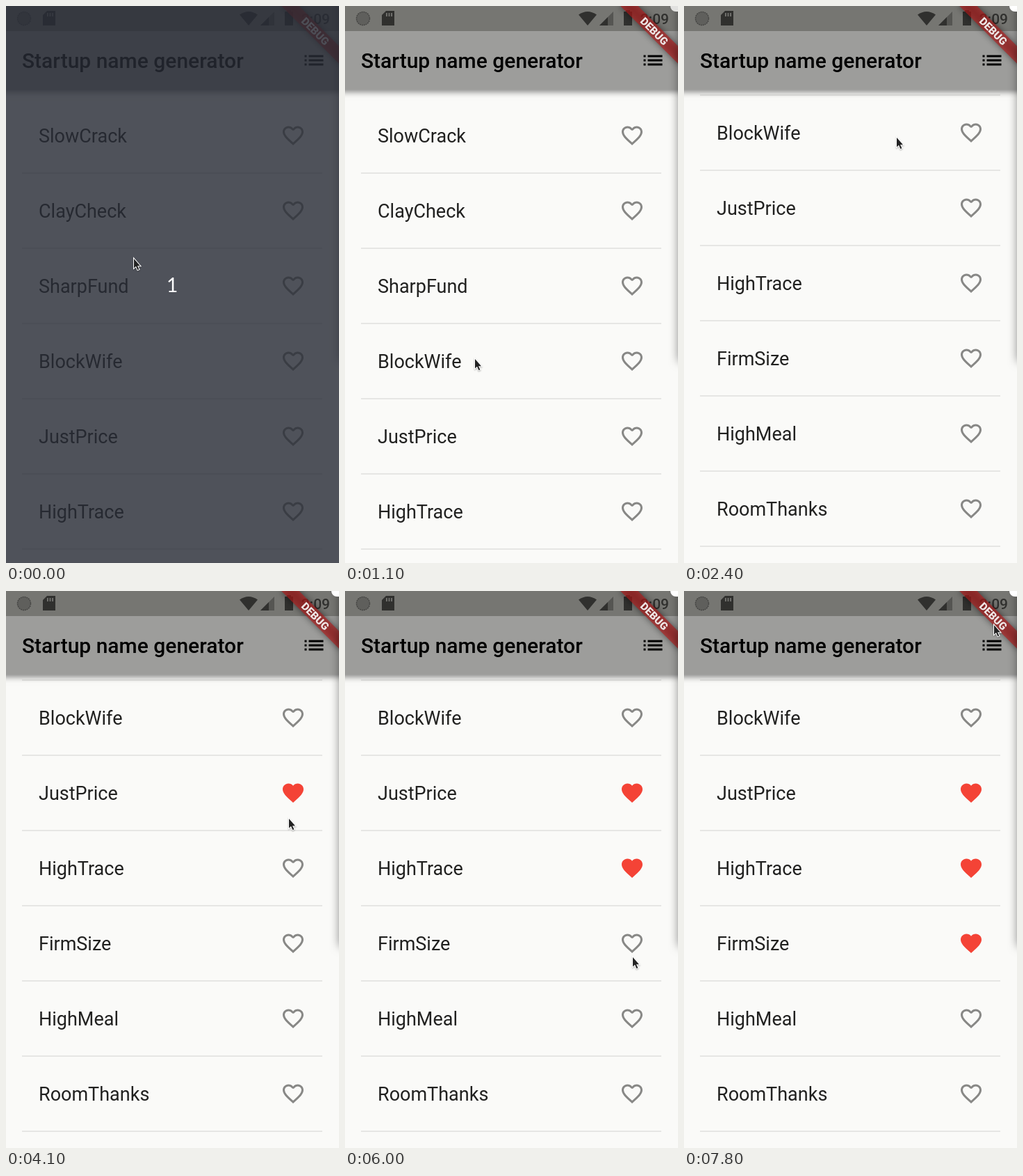
Recreate the animation shown at these times as an HTML page with a canvas. Size 479 by 800 pixels, loop 8 s.

```html
<!DOCTYPE html>
<html lang="en">
<head>
<meta charset="utf-8">
<title>Startup name generator</title>
<style>
  html, body { margin: 0; width: 100%; height: 100%; overflow: hidden; background: #fafaf8; }
  canvas { display: block; }
</style>
</head>
<body>
<canvas id="stage" width="479" height="800"></canvas>
<script>
const W = 479, H = 800, LOOP = 8000, STEP = 100;
const ctx = document.getElementById('stage').getContext('2d');

const NAMES = ['SlowCrack', 'ClayCheck', 'SharpFund', 'BlockWife', 'JustPrice',
  'HighTrace', 'FirmSize', 'HighMeal', 'RoomThanks'];
const LIKED_AT = { JustPrice: 3700, HighTrace: 4900, FirmSize: 6500 };
const ROW_H = 108, FIRST_ROW = 186, SCROLL_END = 328;

const smooth = p => p * p * (3 - 2 * p);
const out = p => 1 - (1 - p) ** 4;
const phase = (t, from, to) => Math.min(1, Math.max(0, (t - from) / (to - from)));

// Strokes of the pointer: begin, end, destination, easing across and down
const POINTER_START = { x: 184, y: 363 };
const POINTER_MOVES = [
  { from: 0, to: 600, x: 185, y: 518, ease: smooth },
  { from: 1000, to: 1900, x: 245, y: 186, ease: smooth },
  { from: 2300, to: 3200, x: 407, y: 275, ease: out, easeY: smooth },
  { from: 4020, to: 4600, x: 406, y: 391, ease: out },
  { from: 5200, to: 5900, x: 414, y: 530, ease: smooth },
  { from: 5950, to: 6200, x: 413, y: 494, ease: smooth },
  { from: 6700, to: 7200, x: 434, y: 118, ease: smooth },
  { from: 7300, to: 7800, x: 446, y: 49, ease: smooth }
];

const HEART = new Path2D('M12 21.35l-1.45-1.32C5.4 15.36 2 12.28 2 8.5 2 5.42 4.42 3 7.5 3c1.74 0 3.41.81 4.5 2.09C13.09 3.81 14.76 3 16.5 3 19.58 3 22 5.42 22 8.5c0 3.78-3.4 6.86-8.55 11.54z');
const ARROW = new Path2D('M0 0V13.5L3 10.8 5.4 16.2 7.4 15.3 5 10.2H9z');

function pointerAt(t) {
  const pos = { ...POINTER_START };
  for (const { from, to, x, y, ease, easeY = ease } of POINTER_MOVES) {
    const p = phase(t, from, to);
    pos.x += (x - pos.x) * ease(p);
    pos.y += (y - pos.y) * easeY(p);
  }
  return pos;
}

function rect(color, x, y, w, h) {
  ctx.fillStyle = color;
  ctx.fillRect(x, y, w, h);
}

function shape(color, points) {
  ctx.fillStyle = color;
  ctx.beginPath();
  points.forEach(([x, y]) => ctx.lineTo(x, y));
  ctx.fill();
}

function text(str, x, y, font, color, align = 'left') {
  ctx.font = font;
  ctx.fillStyle = color;
  ctx.textAlign = align;
  ctx.fillText(str, x, y);
}

function drawHeart(cx, cy, liked) {
  ctx.save();
  ctx.translate(cx - 18, cy - 18);
  ctx.scale(1.5, 1.5);
  if (liked) {
    ctx.fillStyle = '#f44336';
    ctx.fill(HEART);
  } else {
    ctx.clip(HEART);
    ctx.lineWidth = 4;
    ctx.lineJoin = 'round';
    ctx.strokeStyle = '#888886';
    ctx.stroke(HEART);
  }
  ctx.restore();
}

function drawList(t) {
  const scroll = Math.round(SCROLL_END * smooth(phase(t, 1105, 1920)));
  NAMES.forEach((name, i) => {
    const y = FIRST_ROW + i * ROW_H - scroll;
    text(name, 47, y + 10, '27px Roboto, sans-serif', '#212120');
    drawHeart(413, y, t >= LIKED_AT[name]);
    rect('#e6e6e4', 23, y + 53, 432, 2);
  });
}

function drawStatusBar() {
  const back = '#767672', dark = '#30302e';
  rect(back, 0, 0, W, 36);

  ctx.fillStyle = '#5f5f5c';
  ctx.strokeStyle = '#464644';
  ctx.lineWidth = 1.5;
  ctx.beginPath();
  ctx.arc(26, 18, 9.5, 0, 7);
  ctx.fill();
  ctx.save();
  ctx.setLineDash([2, 1]);
  ctx.stroke();
  ctx.restore();

  shape(dark, [[59, 7], [71, 7], [71, 28], [53, 28], [53, 13]]);
  for (let i = 0; i < 3; i++) rect(back, 59 + i * 3.6, 10, 1.8, 5);

  ctx.fillStyle = dark;
  ctx.beginPath();
  ctx.moveTo(349, 28);
  ctx.lineTo(336, 12.5);
  ctx.quadraticCurveTo(349, 3.5, 362, 12.5);
  ctx.fill();

  shape('#555552', [[386, 8], [386, 28], [366, 28]]);
  shape(dark, [[378, 16], [378, 28], [366, 28]]);

  rect(dark, 404, 6, 6, 3);
  rect(dark, 401, 8, 12, 20);
  text('2:09', 466, 26, '500 21px Roboto, sans-serif', dark, 'right');
}

function drawAppBar() {
  ctx.save();
  ctx.shadowColor = 'rgba(0,0,0,.5)';
  ctx.shadowBlur = 9;
  ctx.shadowOffsetY = 3;
  rect('#9d9d9b', -20, 0, W + 40, 120);
  ctx.restore();
  drawStatusBar();
  text('Startup name generator', 23, 89, '500 30px Roboto, sans-serif', '#000');
  for (let y = 70.5; y < 86; y += 6) {
    rect('#000', 429.5, y, 3, 3);
    rect('#000', 435.5, y, 21, 3);
  }
}

function drawRibbon() {
  ctx.save();
  ctx.translate(481, 0);
  ctx.rotate(Math.PI / 4);
  ctx.filter = 'blur(5px)';
  rect('rgba(0,0,0,.5)', -60, 42, 120, 18);
  ctx.filter = 'none';
  rect('rgba(183,28,28,.63)', -62, 42, 124, 18);
  text('DEBUG', 0, 56.5, '900 15.3px Roboto, sans-serif', '#eee6e5', 'center');
  ctx.restore();
}

// Edge of the neighbouring window: its shadow and rounded corner
function drawNeighbour(t) {
  ctx.save();
  ctx.shadowColor = 'rgba(0,0,0,.5)';
  ctx.shadowBlur = 14;
  rect('#fff', 480, -20, 40, 530);
  ctx.restore();
  if (t < 100) return;
  ctx.fillStyle = t < 1200 ? '#e2e2e0' : '#fff';
  ctx.beginPath();
  ctx.roundRect(468, -30, 60, 38, 8);
  ctx.fill();
}

function drawPointer(t) {
  const { x, y } = pointerAt(t);
  ctx.save();
  ctx.translate(Math.round(x), Math.round(y));
  ctx.shadowColor = 'rgba(0,0,0,.3)';
  ctx.shadowBlur = 2;
  ctx.shadowOffsetY = 1;
  ctx.lineWidth = 2;
  ctx.strokeStyle = '#fff';
  ctx.stroke(ARROW);
  ctx.shadowColor = 'transparent';
  ctx.fillStyle = '#222';
  ctx.fill(ARROW);
  ctx.restore();
}

function draw(t) {
  rect('#fafaf8', 0, 0, W, H);
  drawList(t);
  drawAppBar();
  drawRibbon();
  drawNeighbour(t);
  if (t < 100) {
    rect('rgba(40,44,54,.81)', 0, 0, W, H);
    text('1', 239, 411, '28px Lato, sans-serif', '#fff', 'center');
  }
  drawPointer(t);
}

const start = performance.now();
function tick() {
  const t = (performance.now() - start) % LOOP;
  draw(Math.floor(t / STEP) * STEP);
  requestAnimationFrame(tick);
}
tick();
</script>
</body>
</html>
```
